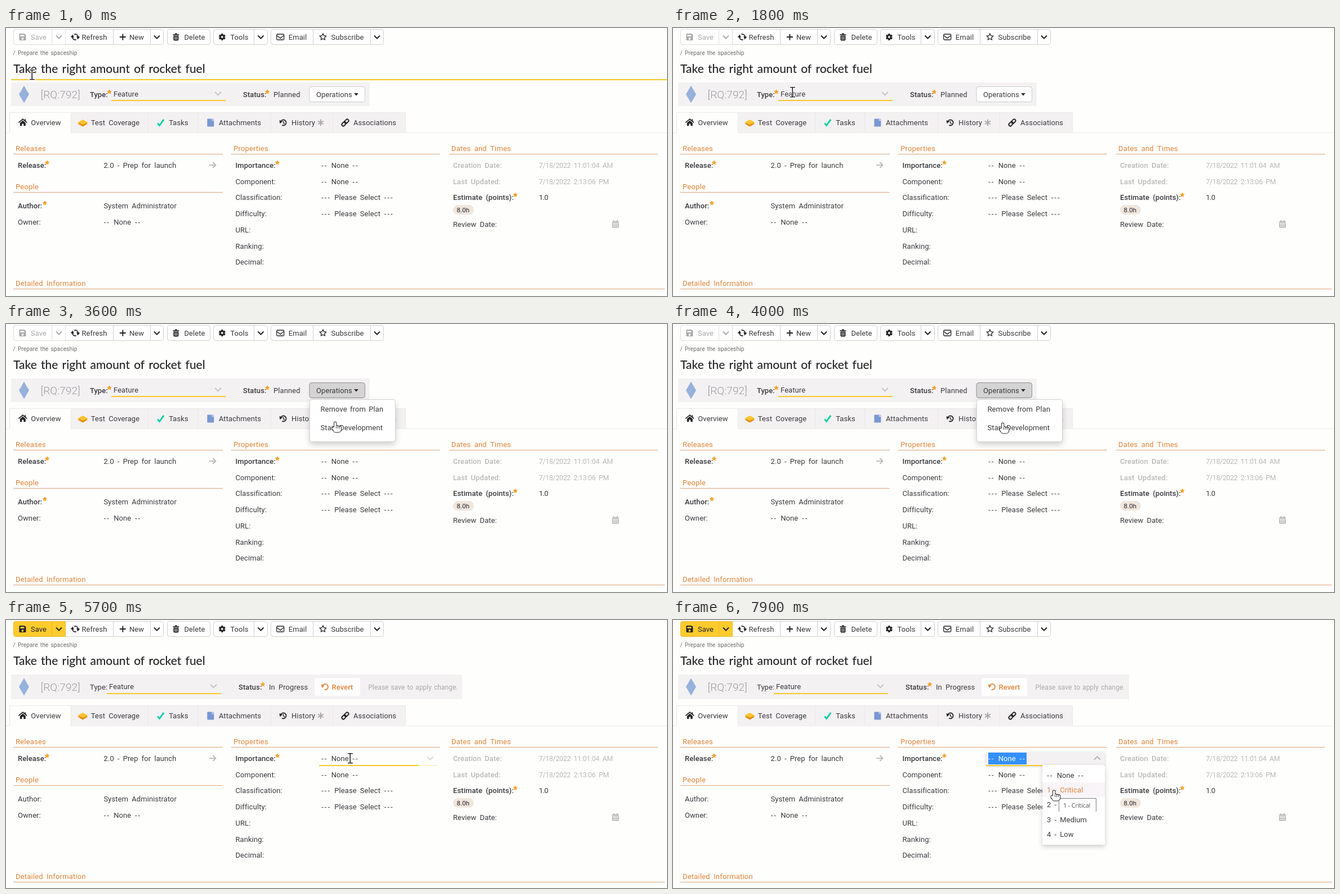
Animation, 1174 px wide and 477 px high, one loop 8000 ms. Source, as an HTML page with a canvas:

```html
<!DOCTYPE html>
<html lang="en">
<head>
<meta charset="utf-8">
<title>Requirement details</title>
<style>
html, body { margin: 0; width: 100%; height: 100%; overflow: hidden; background: #fefefd; }
canvas { display: block; }
</style>
</head>
<body>
<canvas id="stage" width="1174" height="477"></canvas>
<script>
const ctx = document.getElementById('stage').getContext('2d');
const LOOP = 8000, STEP = 100, TAU = Math.PI * 2;
const INK = '#3a3a3e', DARK = '#242428', MUTE = '#b9b9bb', ORANGE = '#e08439', RULE = '#e0a578',
  YELLOW = '#f8c92a', PANEL = '#f4f1f3', PAGE = '#fefefd', STAR = '#f3a32b', EDGE = '#d0d0d0';

const clamp = v => Math.max(0, Math.min(1, v));
const phase = (t, a, b) => clamp((t - a) / (b - a));
const ease = k => k * k * (3 - 2 * k);

// ---- text ----
function setFont({ size = 13, w = 400, ls = 0.08, ws = 2.8, font = 'Roboto' } = {}) {
  ctx.font = `${w} ${size}px ${font}, sans-serif`;
  ctx.letterSpacing = ls + 'px';
  ctx.wordSpacing = ws + 'px';
}

function text(s, x, y, style = {}) {
  setFont(style);
  ctx.fillStyle = style.c || INK;
  ctx.fillText(s, x, y);
  return ctx.measureText(s).width;
}

// Label between two runs of n wide dashes
function dashed(n, label, x, y, c = INK) {
  const run = '-'.repeat(n), wide = { c, font: 'Open Sans', ls: 1.4 };
  x += text(run, x, y, wide) + 6.5;
  x += text(label, x, y, { c }) + 6.5;
  text(run, x, y, wide);
}

// ---- shapes ----
function rect(x, y, w, h, c) {
  ctx.fillStyle = c;
  ctx.fillRect(x, y, w, h);
}

function paint(fill, stroke, lw = 1) {
  if (fill) { ctx.fillStyle = fill; ctx.fill(); }
  if (stroke) { ctx.strokeStyle = stroke; ctx.lineWidth = lw; ctx.stroke(); }
}

function box(x, y, w, h, r, fill, stroke, lw) {
  ctx.beginPath();
  ctx.roundRect(x, y, w, h, r);
  paint(fill, stroke, lw);
}

function raised(x, y, w, h, r, fill, stroke, blur = 10) {
  ctx.save();
  ctx.shadowColor = 'rgba(0,0,0,.2)';
  ctx.shadowBlur = blur;
  ctx.shadowOffsetY = blur * 0.4;
  box(x, y, w, h, r, fill);
  ctx.restore();
  if (stroke) box(x, y, w, h, r, null, stroke);
}

// Regular figure with its first corner up; inner < 1 makes a star
function figure(x, y, n, rx, ry, fill, stroke, inner = 1) {
  const steps = inner < 1 ? n * 2 : n;
  ctx.beginPath();
  for (let i = 0; i < steps; i++) {
    const a = i * TAU / steps, q = inner < 1 && i % 2 ? inner : 1;
    ctx.lineTo(x + rx * q * Math.sin(a), y - ry * q * Math.cos(a));
  }
  ctx.closePath();
  paint(fill, stroke, 1.3);
}

const star = (x, y, r, fill, stroke) => figure(x, y, 5, r, r, fill, stroke, 0.5);
const diamond = (x, y, rx, ry, c) => figure(x, y, 4, rx, ry, c);

function line(c, lw, ...pts) {
  ctx.beginPath();
  for (const [x, y] of pts) ctx.lineTo(x, y);
  paint(null, c, lw);
}

function arc(r, a, b, c, lw) {
  ctx.beginPath();
  ctx.arc(0, 0, r, a, b);
  paint(null, c, lw);
}

const chevron = (x, y, c, r = 5, dir = 1) =>
  line(c, 2, [x - r, y - r / 2 * dir], [x, y + r / 2 * dir], [x + r, y - r / 2 * dir]);

function at(x, y, draw) {
  ctx.save();
  ctx.translate(x, y);
  draw();
  ctx.restore();
}

// Arc with an arrowhead on its first end
function loopArrow(a, sweep, c) {
  arc(5, a, a + sweep, c, 1.8);
  at(5 * Math.cos(a), 5 * Math.sin(a), () => {
    ctx.rotate(a);
    figure(0, 0, 3, 3.6, 3.6, c);
  });
}

// ---- icons, each around its own centre ----
const icon = {
  save(c, hole) {
    box(-6, -6, 12, 12, [1, 4, 1, 1], c);
    rect(-4, -4, 7, 3, hole);
    box(-2, 1, 4, 4, 2, hole);
  },
  refresh(c) {
    ctx.scale(-1, 1);
    for (const a of [0, Math.PI]) loopArrow(a - 0.2, 2.1, c);
  },
  plus(c) { rect(-5.5, -1, 11, 2, c); rect(-1, -5.5, 2, 11, c); },
  trash(c) {
    rect(-2, -6.5, 4, 2, c);
    rect(-5.5, -5, 11, 1.6, c);
    box(-4.5, -2.6, 9, 9, [0, 0, 2, 2], c);
    for (let x = -2; x <= 2; x += 2) rect(x - 0.4, -1, 0.8, 6, '#fff');
  },
  gear(c) {
    for (let i = 0; i < 6; i++) { ctx.rotate(TAU / 6); rect(-1.6, -6, 3.2, 4, c); }
    arc(3.2, 0, TAU, c, 2.6);
  },
  mail(c) {
    box(-6.5, -5, 13, 10, 1.5, null, c, 1.3);
    line(c, 1.4, [-6, -2.5], [0, 2], [6, -2.5]);
  },
  star(c) { star(0, 0, 6, null, c); },
  house(c) {
    line(c, 1.7, [-7.5, 0], [0, -6.2], [7.5, 0]);
    diamond(0, 0.5, 5, 4.5, c);
    rect(-5, 0.5, 10, 5.2, c);
    rect(3.3, -6, 2, 4, c);
    rect(-1.4, 2, 2.8, 4, PAGE);
  },
  cube() {
    diamond(0, 2.5, 8, 4.5, '#e38d16');
    rect(-8, -1, 16, 3.5, '#f3a21c');
    diamond(0, -1, 8, 4.5, '#fcc32d');
  },
  check() { line('#19cfa6', 3, [-5.5, 1], [-2, 5], [5.5, -5.5]); },
  file() {
    box(-6, -7, 12, 14, [1, 5, 1, 1], '#7898d2');
    rect(2, -7, 4, 4, '#b9caea');
  },
  history(c) {
    loopArrow(Math.PI * 1.1, 4.9, c);
    line(c, 1.4, [0, -3], [0, 0.5], [2.5, 2]);
  },
  link(c) {
    ctx.rotate(-TAU / 8);
    for (const x of [-7.5, -0.9]) box(x, -2.6, 8.4, 5.2, 2.6, null, c, 1.9);
  },
  undo(c) { loopArrow(Math.PI * 1.1, 4.7, c); },
  arrow(c) {
    line(c, 1.8, [-6, 0], [5, 0]);
    line(c, 1.8, [0.5, -5], [5.5, 0], [0.5, 5]);
  },
  asterisk(c) {
    for (let i = 0; i < 3; i++) { ctx.rotate(TAU / 6); rect(-1, -5.7, 2, 11.4, c); }
  },
  calendar(c) {
    box(-6, -5, 12, 11.5, 1.3, c);
    for (let i = 0; i < 3; i++) {
      if (i !== 1) rect(i * 3 - 4, -7, 2, 3, c);
      rect(i * 3 - 4, -1, 2, 2, PAGE);
      rect(i * 3 - 4, 2.5, 2, 2, PAGE);
    }
    rect(-6, -2.6, 12, 0.8, PAGE);
  }
};
const put = (name, x, y, c = DARK, hole) => at(x, y, () => icon[name](c, hole));

// Icon and label centred together between x0 and x1; returns the label's end
function cell(x0, x1, y, name, label, { c = INK, ic = DARK, hole, w, gap = 8 } = {}) {
  setFont({ w });
  const x = (x0 + x1 - 13 - gap - ctx.measureText(label).width) / 2;
  put(name, x + 6.5, y, ic, hole);
  return x + 13 + gap + text(label, x + 13 + gap, y + 4.6, { c, w });
}

// ---- page sections ----
function toolbar(canSave) {
  const top = 2.5, h = 27;
  const groups = [[13, 280], [286, 363], [368, 465], [470, 671]];
  for (const [a, b] of groups) box(a + 0.5, top, b - a - 1, h, 4, '#fff', EDGE);
  const fill = canSave ? '#fdcb2d' : '#fff', edge = canSave ? '#e8ba30' : '#dedede';
  const c = canSave ? DARK : '#a9a9a9';
  box(13.5, top, 92, h, [4, 0, 0, 4], fill, edge);
  rect(81, top, 1, h, edge);
  for (const x of [190, 256, 440, 545, 647]) rect(x, 3, 1, 26, EDGE);
  cell(13, 82, 16, 'save', 'Save', { c, ic: c, hole: fill });
  cell(106, 190, 16, 'refresh', 'Refresh', { gap: 5 });
  cell(190, 256, 16, 'plus', 'New', { gap: 5 });
  cell(286, 363, 16, 'trash', 'Delete');
  cell(368, 440, 16, 'gear', 'Tools');
  cell(470, 545, 16, 'mail', 'Email');
  cell(545, 647, 16, 'star', 'Subscribe');
  chevron(94, 16, c);
  for (const x of [268, 452.5, 659]) chevron(x, 16, DARK);
}

function need(s, x, y, starX) {
  text(s, x, y, { w: 500 });
  star(starX, y - 9.3, 4.6, STAR);
}

function statusBar(t) {
  const moved = t >= 4600, plain = t >= 4700, s = plain ? -8 : 0, y = moved ? 1 : 0;
  rect(9, 97, moved ? 809 + s : 637, 42 + 2 * y, PANEL);
  diamond(32, 118 + y, 9, 15.5, '#96b2dc');
  text('[RQ:792]', 61.5, 124.5 + y, { c: '#9b9b9d', size: 19, w: 300 });
  if (plain) text('Type:', 149, 123 + y);
  else need('Type:', 149, 123 + y, 183.5);
  at(s, 0, () => {
    text('Feature', 191, 122 + y);
    chevron(376.5, 116.5 + y, '#c6c6c8', 5.5);
    rect(187, 128 + 2 * y, 203, 2, YELLOW);
    need('Status:', 421, 123 + y, 464);
    text(moved ? 'In Progress' : 'Planned', 475, 123 + y);
    if (!moved) return operations(t);
    box(556, 103, 81, 32, 3, '#fff');
    cell(556, 637, 119, 'undo', 'Revert', { c: ORANGE, ic: ORANGE, w: 500, gap: 5 });
    text('Please save to apply change.', 651.5, 123.5, { c: '#a9a9ab', size: 12, ls: 0, ws: 1.2 });
  });
}

function operations(t) {
  const active = t >= 3400 && t < 4400, hover = t >= 2500;
  const [fill, edge] = active ? ['#d4d4d4', '#8f8f8f'] : hover ? ['#e6e6e6', '#adadad'] : ['#fff', '#ccc'];
  box(539, 104.5, 98.5, 27, 4, fill, edge);
  text('Operations', 551, 123);
  at(622, 117.5, () => { ctx.rotate(Math.PI); figure(0, 0, 3, 4.5, 3, DARK); });
}

function tabs() {
  const line = '#ebe7ea', edges = [6, 115, 252, 340, 470, 580, 709];
  rect(0, 186, 1174, 1, '#efedee');
  rect(6, 150, 704, 36, PANEL);
  rect(6, 150, 704, 1, line);
  rect(6, 151, 109, 36, PAGE);
  for (const x of edges) rect(x, 151, 1, 35, line);
  const names = ['Overview', 'Test Coverage', 'Tasks', 'Attachments', 'History', 'Associations'];
  const icons = ['house', 'cube', 'check', 'file', 'history', 'link'];
  names.forEach((name, i) => {
    const extra = name === 'History' ? 15 : 0;
    const end = cell(edges[i], edges[i + 1] - extra, 168.4, icons[i], name);
    if (extra) put('asterisk', end + 10, 168.4, '#aaa');
  });
}

function heading(s, x, y, w) {
  text(s, x + 4, y, { c: ORANGE, ls: 0.2 });
  rect(x, y + 5, w, 1, RULE);
}

function details(t) {
  const row = i => 249 + i * 28.7;
  const [a, b, c] = [21, 407.5, 794], value = 152.5;
  heading('Releases', 13, 219, 372);
  heading('People', 13, 287, 372);
  heading('Properties', 400, 219, 371);
  heading('Dates and Times', 787, 219, 371);
  heading('Detailed Information', 13, 459, 1157);

  need('Release:', a, row(0), 73);
  text('2.0 - Prep for launch', a + value, row(0));
  put('arrow', 367, 244, MUTE);
  if (t < 4700) need('Author:', a, 321, 69);
  else text('Author:', a, 321);
  text('System Administrator', a + value, 321);
  text('Owner:', a, 350);
  dashed(2, 'None', a + value, 350);

  need('Importance:', b, row(0), 482);
  ['Component:', 'Classification:', 'Difficulty:', 'URL:', 'Ranking:', 'Decimal:']
    .forEach((s, i) => text(s, b, row(i + 1)));
  for (let i = 0; i < 4; i++)
    dashed(i < 2 ? 2 : 3, i < 2 ? 'None' : 'Please Select', b + value, row(i));

  [['Creation Date:', '7/18/2022 11:01:04 AM'], ['Last Updated:', '7/18/2022 2:13:06 PM']].forEach(([s, v], i) => {
    text(s, c, row(i), { c: MUTE, w: 500 });
    text(v, c + value, row(i), { c: MUTE, size: 12.3, ls: -0.25 });
  });
  need('Estimate (points):', c, row(2), 904.5);
  text('1.0', c + value, row(2), { ls: -0.6 });
  box(c, 315, 37, 17, 8.5, '#f0e6dc');
  text('8.0h', c + 6.5, 328, { size: 11.5, c: DARK });
  text('Review Date:', c, 354);
  put('calendar', 1082.5, 349, MUTE);
}

function planMenu() {
  raised(539.5, 134.5, 152, 75, 4, '#fff', '#d2d2d2', 12);
  text('Remove from Plan', 558.5, 156, { ws: 2 });
  text('Start Development', 558.5, 189, { ws: 2 });
}

function importance(t) {
  const open = t >= 6600, grow = 1 - (1 - phase(t, 5400, 5900)) ** 2;
  if (open) {
    raised(556, 235, 211, 24, 3, PANEL, null, 4);
    rect(560, 236, 68, 21, '#3390ff');
    dashed(2, 'None', 560, 251, '#fff');
  }
  rect(556, 258, 211, 2, '#fbf3cf');
  rect(556, 258, 211 * grow, 2, YELLOW);
  chevron(753.5, 246, open ? '#b5b5b8' : '#dadadc', 5.5, open ? -1 : 1);
  if (t >= 6400 && !open) rect(602, 236, 1, 20, DARK);
  if (open) choices(t);
}

function choices(t) {
  const [x, y] = pointer(t), hot = x > 656 && y > 289;
  ctx.globalAlpha = t < 6700 ? 0.6 : 1;
  raised(656, 258, 111, 142, 2, '#fff', null, 8);
  if (hot) rect(656, 289, 111, 26.5, '#f8f4f8');
  dashed(2, 'None', 664, 280.5);
  ['Critical', 'High', 'Medium', 'Low'].forEach((s, i) =>
    text(`${i + 1} - ${s}`, 664, 306.5 + i * 26.6, { c: hot && !i ? ORANGE : INK }));
  ctx.globalAlpha = 1;
  if (t < 7900) return;
  rect(685, 317, 67, 24, '#fff');
  line('#7a7a7a', 1, [685.5, 341], [685.5, 317.5], [751.5, 317.5], [751.5, 341]);
  text('1 - Critical', 693, 333.5, { font: 'Open Sans', size: 11, ls: -0.2, ws: 0, c: '#575757' });
}

// ---- pointer ----
// Eased moves: start, end, x, y, downward bow
const moves = [
  [600, 1000, 42, 103, 0],
  [1300, 2600, 557, 109, 10],
  [3400, 3620, 586, 176, 0],
  [5300, 5700, 611, 246, 0],
  [6900, 7500, 677, 303, 0]
];
function pointer(t) {
  let x = 46, y = 83;
  for (const [a, b, toX, toY, bow] of moves) {
    const k = ease(phase(t, a, b));
    x += (toX - x) * k;
    y += (toY - y) * k + bow * Math.sin(Math.PI * k);
  }
  return [x, y];
}

function beamCursor() {
  for (const [c, p] of [['#fff', 1], ['#111', 0]]) {
    rect(-0.5 - p, -8, 1.5 + 2 * p, 16, c);
    for (const y of [-9, 8]) rect(-4 - p, y - p, 9 + 2 * p, 1.3 + 2 * p, c);
  }
}

function handCursor() {
  for (const edge of ['#222', null]) {
    const part = (x, y, w, h, r) => box(x, y, w, h, r, '#fff', edge, 2);
    part(-2, 0.5, 3.4, 14, 1.7);
    part(-5.5, 9.5, 4, 5, 2);
    for (let i = 1; i < 4; i++) part(i * 3 - 2, 6.5 + i * 0.6, 3.2, 8, 1.5);
    part(-3.5, 11, 13, 7.5, [2, 1, 4, 4]);
  }
  for (let i = 0; i < 3; i++) rect(i * 3 + 1, 8, 0.9, 4, '#222');
}

function arrowCursor() {
  ctx.beginPath();
  for (const [x, y] of [[0, 0], [0, 16], [3.7, 12.6], [6.2, 18], [8.6, 17], [6.2, 11.6], [11.3, 11.4]]) ctx.lineTo(x, y);
  ctx.closePath();
  paint('#fff', '#111');
}

function cursor(t) {
  const [x, y] = pointer(t);
  const beam = t < 800 || (x > 187 && x < 365) || (t >= 5600 && t < 7000);
  const hand = (t >= 2500 && t < 5400) || t >= 7300;
  at(Math.round(x), Math.round(y), beam ? beamCursor : hand ? handCursor : arrowCursor);
}

function draw(t) {
  rect(0, 0, 1174, 477, PAGE);
  toolbar(t >= 4700);
  text('/ Prepare the spaceship', 12.5, 48, { c: '#6d6d70', size: 10.2, ws: 1.5 });
  text('Take the right amount of rocket fuel', 13, 80, { c: DARK, size: 21, w: 500, font: 'Lato', ls: -0.05, ws: 2 });
  rect(9, 91, 1165 * (1 - phase(t, 600, 1000)), 2, YELLOW);
  statusBar(t);
  at(0, t >= 4600 ? 2 : 0, () => { tabs(); details(t); });
  if (t >= 3400 && t < 4600) planMenu();
  if (t >= 5500) importance(t);
  cursor(t);
}

function tick(now) {
  draw(Math.floor(now % LOOP / STEP) * STEP);
  requestAnimationFrame(tick);
}
requestAnimationFrame(tick);
</script>
</body>
</html>
```
